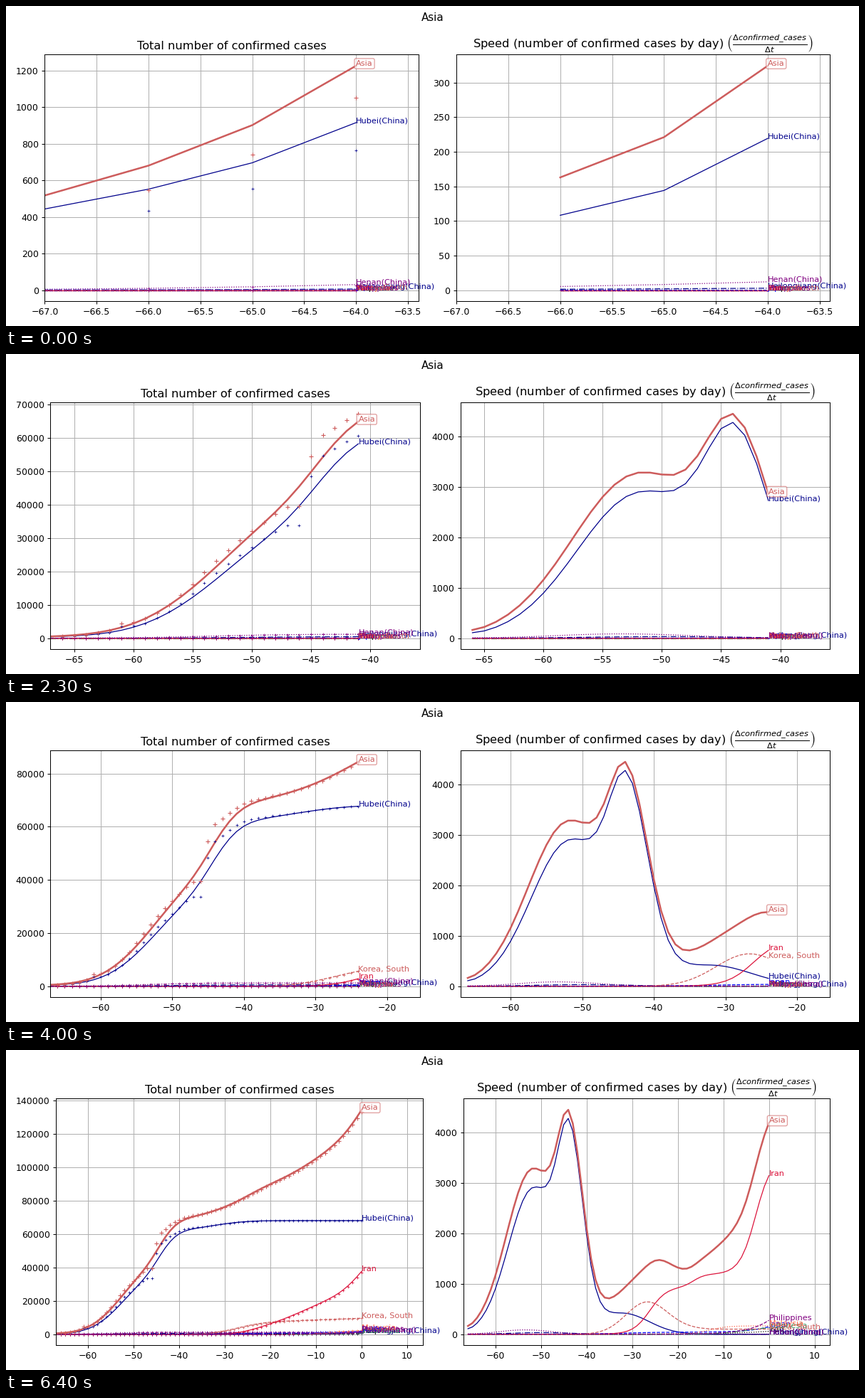
A matplotlib script that plays this animation: 1197x450 px, repeating every 9.4 s.

```python
import numpy as np
import matplotlib.pyplot as plt
from matplotlib.animation import FuncAnimation

W, H, DPI = 1197, 450, 90
FIRST, STEPS, HOLD = -67, 65, 29
DAYS = np.arange(FIRST, 1)
T = DAYS[1:]

plt.rcParams.update({"font.family": "DejaVu Sans", "font.size": 10})


def bump(top, mid, rise, fall):
    """Bell curve with its own width on either side."""
    return top * np.exp(-0.5 * ((T - mid) / np.where(T < mid, rise, fall)) ** 2)


def logistic(top, mid, width):
    return top / (1 + np.exp(-(T - mid) / width))


def growth(today, scale):
    return today * np.exp(T / scale)


class Region:
    """Daily speed, its running total and the reported points."""

    def __init__(self, name, color, style, start, speed, reported=None):
        self.name, self.color, self.style = name, color, style
        self.main = False
        self.speed = speed
        self.total = start + np.concatenate([[0], np.cumsum(speed)])
        extra = -0.25 * speed if reported is None else reported
        self.points = self.total[1:] + extra


def combine(name, color, parts):
    whole = Region(name, color, "-", 0, sum(p.speed for p in parts))
    whole.total = sum(p.total for p in parts)
    whole.points = sum(p.points for p in parts)
    whole.main = True
    return whole


# Reports first trail, then surge, stall and catch up in one jump.
backlog = (bump(-150, -64, 3, 1.5) + bump(1250, -61, 0.4, 0.7)
           + bump(1900, -53, 2, 2.6)
           + np.where(T < -45, -5900 * np.exp(T + 46.0),
                      6600 * np.exp(-abs(T + 44) / 2.9)))

hubei = (bump(2870, -51.75, 5.4, 5.4) + bump(3160, -43.6, 2.6, 2.9)
         + bump(415, -32, 8, 5.7) + 20 * np.exp(-2.0 * (T + 66)))
korea = bump(640, -26.7, 4.6, 4.75) + logistic(100, -20, 2)
iran = (logistic(940, -26.1, 1.85) + logistic(250, -16.5, 1.2)
        + logistic(2330, -2.9, 1.75))
japan = growth(110, 4) + logistic(40, -32, 4)
elsewhere = (bump(297, -55.5, 5.5, 8) + bump(100, -35, 5, 4.5)
             + bump(380, -5, 6, 4))

parts = [
    Region("Iraq", "black", ":", 0, growth(57, 9)),
    Region("Hubei(China)", "darkblue", "-", 444, hubei, backlog),
    Region("Heilongjiang(China)", "darkblue", "-.", 0,
           bump(31, -50, 6.4, 6.4)),
    Region("Henan(China)", "purple", ":", 5, bump(86, -53.5, 5.3, 5.8)),
    Region("Japan", "blue", "--", 2, japan),
    Region("Indonesia", "seagreen", "-.", 0, logistic(150, -5, 3)),
    Region("Korea, South", "indianred", "--", 1, korea),
    Region("Malaysia", "tomato", ":", 0, logistic(165, -13, 2)),
    Region("Iran", "crimson", "-", 0, iran),
    Region("Philippines", "purple", "--", 0, growth(275, 4.5)),
]
hidden = Region("", "none", "-", 66, elsewhere)
asia = combine("Asia", "indianred", parts + [hidden])
regions = parts + [asia]

fig = plt.figure(figsize=(W / DPI, H / DPI), dpi=DPI)
fig.suptitle("Asia", fontsize=12)
left = fig.add_axes([0.05, 0.08, 0.43, 0.77])
right = fig.add_axes([0.53, 0.08, 0.43, 0.77])
left.set_title("Total number of confirmed cases", fontsize=13)
right.set_title("Speed (number of confirmed cases by day) "
                r"$\left(\frac{\Delta confirmed\_cases}{\Delta t}\right)$",
                fontsize=13)


def add_line(ax, r):
    line, = ax.plot([], [], r.style, color=r.color, lw=2 if r.main else 1)
    box = dict(boxstyle="round,pad=0.2", fc="white", ec=r.color, alpha=0.6)
    text = ax.text(0, 0, r.name, color=r.color, fontsize=9,
                   bbox=box if r.main else None)
    return line, text


def add_points(r):
    size, width = (5, 0.9) if r.main else (2.5, 0.6)
    return left.plot([], [], "+", color=r.color, ms=size, mew=width)[0]


for ax in (left, right):
    ax.grid(True)
totals = [add_line(left, r) for r in regions]
speeds = [add_line(right, r) for r in regions]
marks = [add_points(r) for r in regions]


def label_width(ax):
    """Pixels taken by the y tick labels, their pad and the tick."""
    top = max(t for t in ax.get_yticks() if t <= ax.get_ylim()[1])
    return len(str(int(top))) * 7.96 + 8.75


def overhang():
    """How far the last x label reaches past the axes."""
    x0, x1 = left.get_xlim()
    ticks = [t for t in left.get_xticks() if t <= x1 + 1e-9]
    step, last = ticks[1] - ticks[0], ticks[-1]
    ems = len(f"{abs(last):.0f}") * 0.636 + (0.838 if last < 0 else 0)
    if step % 1:
        ems += 0.954
    return max(0, ems * 6.2 - (x1 - last) / (x1 - x0) * 520)


def layout():
    x0, x1 = 13.85 + label_width(left), 1156.3
    gap = 16.4 + label_width(right) + overhang()
    w = (x1 - x0 - gap) / 2
    for ax, x in ((left, x0), (right, x0 + w + gap)):
        ax.set_position([x / W, 34.6 / H, w / W, 347.1 / H])


def put(pair, x, y):
    line, text = pair
    line.set_data(x, y)
    text.set_position((x[-1], y[-1]))


def draw(i):
    n = min(i, STEPS - 1) + 3
    for r, total, speed, mark in zip(regions, totals, speeds, marks):
        put(total, DAYS[:n + 1], r.total[:n + 1])
        put(speed, T[:n], r.speed[:n])
        mark.set_data(T[:n], r.points[:n])
    peaks = (max(asia.total[n], asia.points[:n].max()), asia.speed[:n].max())
    for ax, peak in zip((left, right), peaks):
        ax.set_xlim(FIRST, FIRST + 1.2 * n)
        ax.set_ylim(-0.05 * peak, 1.05 * peak)
    layout()
    return []


anim = FuncAnimation(fig, draw, frames=STEPS + HOLD, init_func=lambda: draw(0),
                     interval=100, repeat=True, repeat_delay=0)
plt.show()
```
